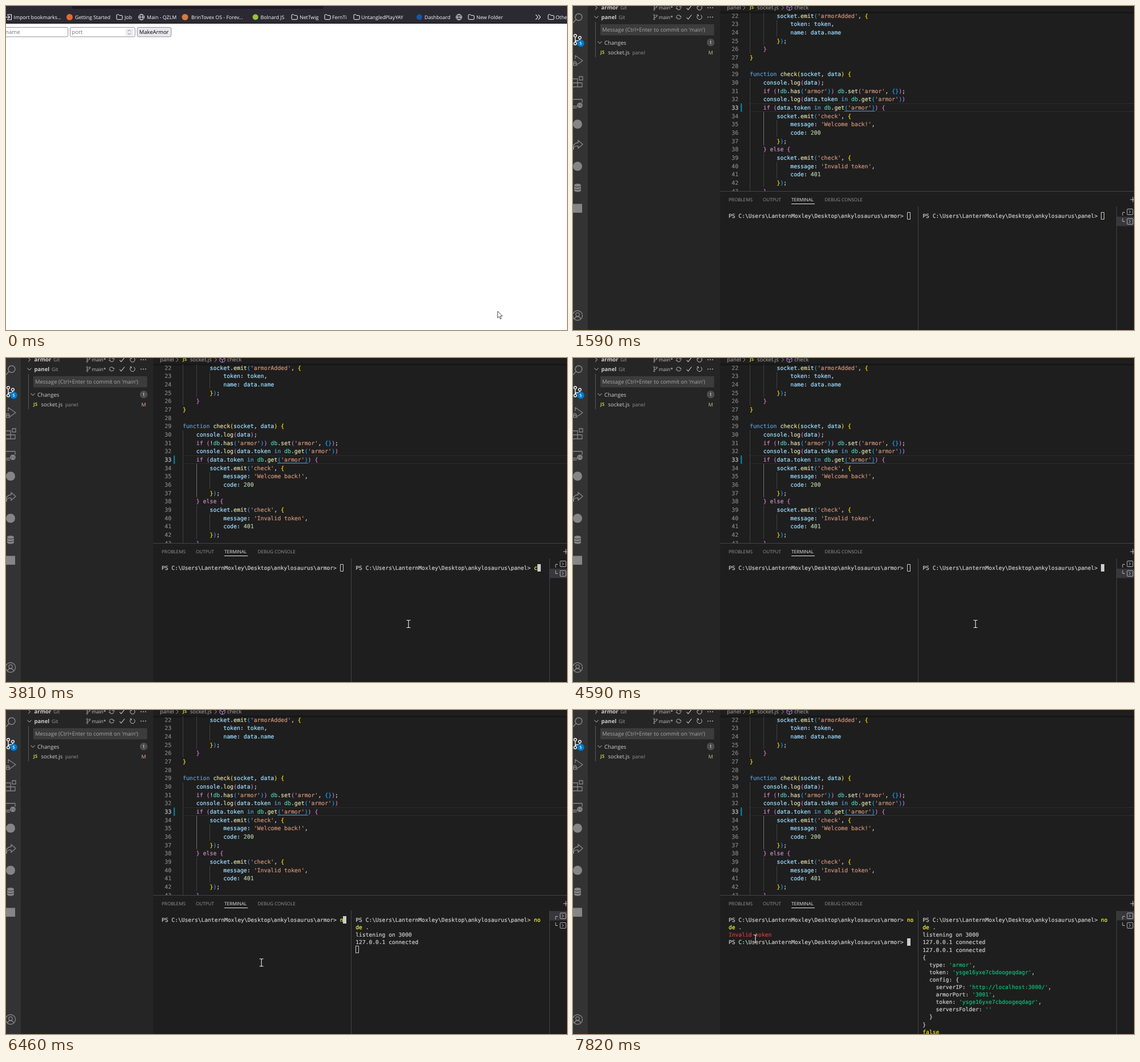
An HTML page with a canvas that plays this animation: 984x569 px, repeating every 7.99 s.

```html
<!DOCTYPE html>
<html lang="en">
<head>
<meta charset="utf-8">
<title>Panel and armor</title>
<style>
html, body { margin: 0; width: 100%; height: 100%; overflow: hidden; background: #fff; }
canvas { display: block; }
</style>
</head>
<body>
<canvas id="stage" width="984" height="569"></canvas>
<script>
const g = document.getElementById('stage').getContext('2d');
const LOOP = 7990;
const UI = '"Open Sans", "Noto Sans", sans-serif';
const MONO = '"DejaVu Sans Mono", "Noto Sans Mono", monospace';
const HOME = 'PS C:\\Users\\LanternMoxley\\Desktop\\ankylosaurus\\';
const GREY = '#cccccc', YELLOW = '#f5f543', GREEN = '#0dbc79';

// Value of the latest step that has started
function at(t, steps) {
  let value;
  for (const [start, v] of steps) if (t >= start) value = v;
  return value;
}

function rect(x, y, w, h, color) {
  g.fillStyle = color;
  g.fillRect(x, y, w, h);
}

function box(x, y, w, h, r, fill, stroke, lw = 1) {
  g.beginPath();
  g.roundRect(x, y, w, h, r);
  if (fill) { g.fillStyle = fill; g.fill(); }
  if (stroke) { g.strokeStyle = stroke; g.lineWidth = lw; g.stroke(); }
}

function disc(x, y, r, color) {
  g.fillStyle = color;
  g.beginPath();
  g.arc(x, y, r, 0, 7);
  g.fill();
}

function icon(x, y, d, color, lw = 1, fill) {
  const path = new Path2D(d);
  g.save();
  g.translate(x, y);
  g.lineJoin = 'round';
  if (fill) { g.fillStyle = fill; g.fill(path); }
  if (color) { g.strokeStyle = color; g.lineWidth = lw; g.stroke(path); }
  g.restore();
}

// y is the middle of the line
function label(s, x, y, size, color, weight = 400) {
  g.font = `${weight} ${size}px ${UI}`;
  g.fillStyle = color;
  g.fillText(s, x, y + size * 0.35);
}

// A hairline stroke gives the letters a little more weight
function mono(s, x, y, pitch, color) {
  g.font = `${pitch / 0.602}px ${MONO}`;
  g.fillStyle = g.strokeStyle = color;
  g.lineWidth = 0.22;
  [...s].forEach((c, i) => {
    if (c === ' ') return;
    g.fillText(c, x + i * pitch, y + 3.5);
    g.strokeText(c, x + i * pitch, y + 3.5);
  });
}

const ring = r => `M${-r} 0a${r} ${r} 0 1 0 ${2 * r} 0a${r} ${r} 0 1 0 ${-2 * r} 0`;
const CHEV_R = 'M-2 -3.5L1.6 0L-2 3.5';
const CHEV_D = 'M-3.5 -1.8L0 1.8L3.5 -1.8';
const FOLDER = 'M-5 -3.2q0 -1.3 1.3 -1.3h2.2l1.5 1.6h3.8q1.3 0 1.3 1.3v4.5q0 1.3 -1.3 1.3h-7.5q-1.3 0 -1.3 -1.3z';
const GLOBE = ring(5) + 'M-5 0h10M0 -5c-3.2 3 -3.2 7 0 10M0 -5c3.2 3 3.2 7 0 10';
const ARROW = 'M0 0V11.8L2.7 9.4L4.6 13.8L6.4 13L4.5 8.7H8.4Z';
const IBEAM = 'M-3.5 -6.5H-1Q0 -6.5 0 -5.5Q0 -6.5 1 -6.5H3.5M0 -5.5V5.5M-3.5 6.5H-1Q0 6.5 0 5.5Q0 6.5 1 6.5H3.5';

// ---- browser ----

const marks = [
  [13.5, 'Import bookmarks...'], [121, 'Getting Started'], [208, 'Job'],
  [247, 'Main - QZLM'], [325, 'BrinTovex OS - Forev...'], [446.5, 'Bolnard JS'],
  [515, 'NetTwig'], [572, 'FernTi'], [623, 'UntangledPlayYAY'],
  [734, 'Dashboard'], [825, 'New Folder'], [964, 'Other Bookmarks']
];

function browser(t) {
  const white = '#fbfbfe', edge = '#8f8f9d';
  rect(0, 0, 984, 569, '#ffffff');
  rect(0, 0, 984, 31, '#2b2a33');
  rect(0, 30, 984, 1, '#111015');
  box(116, -6, 441, 11, 3, '#1c1b22');
  for (const [x, s] of marks) label(s, x, 20, 8.8, white);
  for (const x of [199, 506, 564, 615, 816, 956]) icon(x, 19.5, FOLDER, white);
  for (const x of [237.5, 794.5]) icon(x, 19.5, GLOBE, white, 0.9);
  icon(5, 19.5, 'M-2 -2.5V-4.5H4.5V4.5H-2V2.5M-6 0H1.5M-1 -2.4L1.5 0L-1 2.4', white, 1.1);
  disc(111.5, 19.5, 5.5, '#e8652e');
  disc(314, 19.5, 5.5, '#d9793a');
  disc(437.5, 19.5, 5, '#9bc13c');
  disc(725, 19.5, 5, '#1456a8');
  icon(931, 19.5, 'M-2 -4.5L2 0L-2 4.5M2.5 -4.5L6.5 0L2.5 4.5', white, 1.1);

  box(-60, 37.5, 168.8, 16.5, 2.5, '#fff', edge);
  label('name', -1, 46, 9.6, '#757575');
  box(112.5, 37.5, 113.8, 16.5, 2.5, '#fff', edge);
  label('port', 115.5, 46, 9.6, '#757575');
  box(209.5, 39.5, 14, 13, 1.5, '#ededf0');
  icon(216.3, 43.3, 'M-2.6 1.2L0 -1.4L2.6 1.2', '#777', 0.9);
  icon(216.3, 48.8, 'M-2.6 -1.2L0 1.4L2.6 -1.2', '#777', 0.9);
  box(230.2, 37.5, 59.6, 16.5, 3, '#e9e9ed', edge);
  label('MakeArmor', 233.8, 46, 9.4, '#000');

  const tip = at(t, [[0, [862.4, 536]], [200, [737, 557]], [430, null]]);
  if (tip) icon(...tip, ARROW, '#222', 0.8, '#fff');
}

// ---- editor ----

const PITCH = 5.935, ROW = 14.67;
const code = `        socket.emit('armorAdded', {
            token: token,
            name: data.name
        });
    }
}

function check(socket, data) {
    console.log(data);
    if (!db.has('armor')) db.set('armor', {});
    console.log(data.token in db.get('armor'))
    if (data.token in db.get('armor')) {
        socket.emit('check', {
            message: 'Welcome back!',
            code: 200
        });
    } else {
        socket.emit('check', {
            message: 'Invalid token',
            code: 401
        });
    }`.split('\n');
const lineY = n => 17.2 + (n - 22) * ROW;

function tokenColor(s, next) {
  if (s[0] === "'") return '#ce9178';
  if (/^(function|in)$/.test(s)) return '#569cd6';
  if (/^(if|else)$/.test(s)) return '#c586c0';
  if (/^\d/.test(s)) return '#b5cea8';
  if (/^\w/.test(s)) return next === '(' ? '#dcdcaa' : s === 'db' ? '#4ec9b0' : '#9cdcfe';
  return '#d4d4d4';
}

function guide(col, from, to, color = '#404040') {
  rect(Math.round(310 + col * PITCH), lineY(from) - ROW / 2, 1, (to - from + 1) * ROW, color);
}

function editor() {
  g.save();
  g.beginPath();
  g.rect(258, 10, 726, 315);
  g.clip();
  rect(311, 171, 673, 1, '#2c2c2c');
  rect(311, 185, 673, 1, '#2c2c2c');
  rect(294, lineY(33) - 7.3, 2.3, ROW, '#0c7d9d');
  guide(0, 22, 26);
  guide(0, 30, 43);
  guide(4, 22, 25);
  guide(4, 34, 37, '#707070');
  guide(4, 39, 42);
  for (const n of [23, 35, 40]) guide(8, n, n + 1);
  rect(310 + 28 * PITCH, 184, 9 * PITCH, 1, '#5a96be');

  const pairs = ['#ffd700', '#da70d6', '#179fff'];
  let depth = 2;
  code.forEach((line, i) => {
    const n = i + 22, y = lineY(n);
    mono(String(n), 278.3, y, PITCH, n === 33 ? '#c6c6c6' : '#858585');
    for (const m of line.matchAll(/'[^']*'|\w+|\s+|./g)) {
      const s = m[0];
      let color = tokenColor(s, line[m.index + s.length]);
      if (/[({]/.test(s[0])) color = pairs[depth++ % 3];
      if (/[)}]/.test(s[0])) color = pairs[--depth % 3];
      mono(s, 310 + m.index * PITCH, y, PITCH, color);
    }
  });
  const shade = g.createLinearGradient(0, 10, 0, 14);
  shade.addColorStop(0, 'rgba(0,0,0,.4)');
  shade.addColorStop(1, 'rgba(0,0,0,0)');
  rect(258, 10, 726, 4, shade);
  g.restore();

  const dim = '#a9a9a9';
  label('panel', 270, 3, 9.5, dim);
  icon(300.5, 3, CHEV_R, dim, 0.9);
  label('JS', 310, 2.5, 8, '#cbcb41', 700);
  label('socket.js', 323, 3, 9.5, dim);
  icon(368, 3, CHEV_R, dim, 0.9);
  icon(379.5, 3, 'M0 -5L4.5 -2.5V2.5L0 5L-4.5 2.5V-2.5ZM-4.5 -2.5L0 0L4.5 -2.5M0 0V5', '#b180d7', 1);
  label('check', 388, 3, 9.5, dim);
}

// ---- side bars ----

function activityBar() {
  const c = '#858585';
  rect(0, 0, 26, 569, '#333333');
  icon(8, 21, 'M-2.5 2.5a6 6 0 1 1 3 1.8a6 6 0 0 1 -3 -1.8L-9 9.5', c, 1.5);
  icon(7, 59, 'M-3 -4.5a2.4 2.4 0 1 0 -.1 0V4.5a2.4 2.4 0 1 0 .1 0M5 -1a2.4 2.4 0 1 0 -.1 0q0 3 -4 3q-4 0 -4 2.5', '#fff', 1.4);
  disc(13.5, 65.5, 6.2, '#007acc');
  label('5', 11.4, 65.5, 7, '#fff', 600);
  icon(8, 96, 'M-4 -3V-9L9 0L-1 7M-5 1.5a3 3.6 0 1 0 .1 0M-10 2l2 1.5M-10 9l2 -1.5M-1 9l-1.5 -1.5M-9 5H-1', c, 1.3);
  icon(8, 133, 'M-9 -5H0V9H-9M-9 2H8V9H0M3 -9H9V-3H3Z', c, 1.3);
  icon(8, 171, 'M1 5H-10M-9 -7H8V-1M-9 8H-1', c, 1.3);
  disc(12, 174.5, 4.8, c);
  icon(12, 174.5, 'M-2.6 -1.5L-1 0L-2.6 1.5M2.6 -1.5L1 0L2.6 1.5', '#333', 0.9);
  disc(8, 207.5, 8, c);
  icon(8, 244, 'M1 -8L9 -1L1 6V2Q-6 1 -9 7Q-8 -3 1 -4Z', c, 1.4);
  disc(-1, 250, 3, c);
  disc(8, 281.5, 8, c);
  icon(8, 319, 'M-6 -4.5a6 2.5 0 0 1 12 0V5a6 2.5 0 0 1 -12 0Z', null, 1, c);
  icon(8, 319, 'M-6 -3.5a6 2.5 0 0 0 12 0M-6 1a6 2.5 0 0 0 12 0', '#333', 1);
  rect(0, 347.5, 16, 15.5, c);
  icon(8, 543.5, ring(8.5) + 'M-5.5 6.3q1 -4.3 5.5 -4.3t5.5 4.3M-3.2 -1.7a3.2 3.2 0 1 0 6.4 0a3.2 3.2 0 1 0 -6.4 0', c, 1.3);
}

function repo(name, y, chevron) {
  const c = '#c5c5c5';
  icon(41, y, chevron, c, 1);
  label(name, 49.5, y, 9.6, GREY, 700);
  label('Git', name === 'armor' ? 83 : 80, y, 8.6, '#9a9a9a');
  icon(144.5, y, 'M-2 -2.2a1.2 1.2 0 1 0 -.1 0V2.2a1.2 1.2 0 1 0 .1 0M2.4 -1.4a1.2 1.2 0 1 0 -.1 0q0 2 -4.3 2.2', c, 0.8);
  label('main*', 150.5, y, 8.6, c);
  icon(185.3, y, 'M-4 -.5A4 4 0 0 1 3.4 -1.5M4 .5A4 4 0 0 1 -3.4 1.5M1.8 -1.2H5V-.8M-1.8 1.2H-5', c, 0.9);
  icon(203.5, y, 'M-4.3 .5L-1.5 3.6L4.5 -4', c, 1.1);
  icon(222, y, 'M-2.5 -3.5A4.2 4.2 0 1 0 2 -3.7M-4.5 -4H-2V-1.4', c, 1);
  for (let i = -1; i < 2; i++) disc(240.8 + i * 4, y, 0.9, c);
}

function sideBar() {
  rect(26, 0, 232, 569, '#252526');
  repo('armor', 3, CHEV_R);
  repo('panel', 19.5, CHEV_D);
  rect(39, 28, 1, 62, '#585858');
  rect(48, 32, 199.5, 19.5, '#3c3c3c');
  label("Message (Ctrl+Enter to commit on 'main')", 51, 41.5, 9.45, '#a6a6a6');
  icon(47, 64, CHEV_D, '#c5c5c5', 1);
  label('Changes', 55, 64.3, 9.6, GREY);
  disc(241.5, 64, 6.8, '#4d4d4d');
  label('1', 239.2, 64, 8, '#fff');
  label('JS', 48, 81.3, 8, '#cbcb41', 700);
  label('socket.js', 61.5, 81.8, 9.5, GREY);
  label('panel', 104, 82, 8.6, '#929292');
  label('M', 237.5, 82, 8.8, '#e2c08d');
}

// ---- terminals ----

const CELL = 5.79, COLS = 56, LINE = 13.1;

// Writes [text, color] parts with wrapping, then the text cursor
function terminal(x, parts, focused) {
  let col = 0, row = 0;
  for (const [s, color] of parts) {
    for (const c of s) {
      if (c === '\n') { col = 0; row++; continue; }
      mono(c, x + col * CELL, 368.6 + row * LINE, CELL, color);
      if (++col === COLS) { col = 0; row++; }
    }
  }
  const cx = Math.round(x + col * CELL), cy = Math.round(362 + row * LINE);
  if (focused) rect(cx, cy, 6, 13, GREY);
  else box(cx + 0.5, cy + 0.5, 5, 12, 0, null, GREY, 1);
}

function command(dir, typed) {
  const [word, rest] = typed.split(/(?= )/);
  return [[HOME + dir + '> ', GREY], [word || '', YELLOW], [rest || '', GREY]];
}

const token = "'ysge16yxe7cbdoogeqdagr'";
const dump = [
  ['127.0.0.1 connected\n{\n  type: ', GREY], ["'armor'", GREEN],
  [',\n  token: ', GREY], [token, GREEN],
  [',\n  config: {\n    serverIP: ', GREY], ["'http://localhost:3000/'", GREEN],
  [',\n    armorPort: ', GREY], ["'3001'", GREEN],
  [',\n    token: ', GREY], [token, GREEN],
  [',\n    serversFolder: ', GREY], ["''", GREEN],
  ['\n  }\n}\n', GREY], ['false\n', '#e5e510']
];

function panelTerm(t) {
  const typed = at(t, [[0, ''], [2570, 'node .'], [3220, ''], [3810, 'c'], [4000, 'cl'],
    [4200, 'cls'], [4400, ''], [4600, 'cls'], [4800, 'node .']]);
  const out = command('panel', typed);
  if (t >= 5020) out.push(['\n', GREY]);
  if (t >= 5410) out.push(['listening on 3000\n', GREY]);
  if (t >= 5670) out.push(['127.0.0.1 connected\n', GREY]);
  if (t >= 7580) out.push(...dump);
  terminal(613.3, out, t >= 2170 && t < 6220);
}

function armorTerm(t) {
  const typed = at(t, [[0, ''], [6460, 'n'], [6600, 'no'], [6800, 'node'], [7000, 'node .']]);
  const out = command('armor', typed);
  if (t >= 7210) out.push(['\n', GREY]);
  if (t >= 7580) out.push(['Invalid token\n', '#d93a3a']);
  if (t >= 7820) out.push(...command('armor', ''));
  terminal(273, out, t >= 6220);
}

function panel(t) {
  const line = '#444444', c = '#c5c5c5';
  rect(258, 325, 726, 1, line);
  [['PROBLEMS', 273], ['OUTPUT', 333], ['TERMINAL', 383], ['DEBUG CONSOLE', 441.5]].forEach(([s, x]) =>
    label(s, x, 340.2, 8.1, s === 'TERMINAL' ? '#e7e7e7' : '#969696'));
  rect(383, 347, 41, 1, '#e7e7e7');
  icon(982, 340, 'M-4.5 0H4.5M0 -4.5V4.5', c, 1);
  rect(605, 352, 1, 217, line);
  rect(953, t < 6220 ? 370 : 353, 31, 16.5, '#37373d');
  rect(953, 352, 1, 217, line);
  icon(964, 364, 'M0 4V-1.5H4', c, 0.9);
  icon(964, 377, 'M0 -4V1.5H4', c, 0.9);
  for (const y of [361.5, 378.3]) {
    box(972, y - 5, 10, 10, 1, null, c, 0.9);
    icon(976.8, y, 'M-1.6 -2.5L1.2 0L-1.6 2.5', c, 0.9);
  }
  armorTerm(t);
  panelTerm(t);
}

function workspace(t) {
  rect(0, 0, 984, 569, '#1e1e1e');
  activityBar();
  sideBar();
  editor();
  panel(t);
  const spot = at(t, [[0, null], [1800, [716, 535]], [1990, [706, 467]], [5410, [694.5, 453.5]],
    [5850, [560, 448]], [6030, [448, 443.5]], [7580, [320, 401.5]]]);
  if (spot) {
    icon(...spot, IBEAM, '#111', 2.6);
    icon(...spot, IBEAM, '#fff', 1.1);
  }
}

let begin;
function draw(now) {
  begin ??= now;
  const t = (now - begin) % LOOP;
  g.textRendering = 'geometricPrecision';
  if (t < 1590) browser(t);
  else workspace(t);
  requestAnimationFrame(draw);
}
requestAnimationFrame(draw);
</script>
</body>
</html>
```
